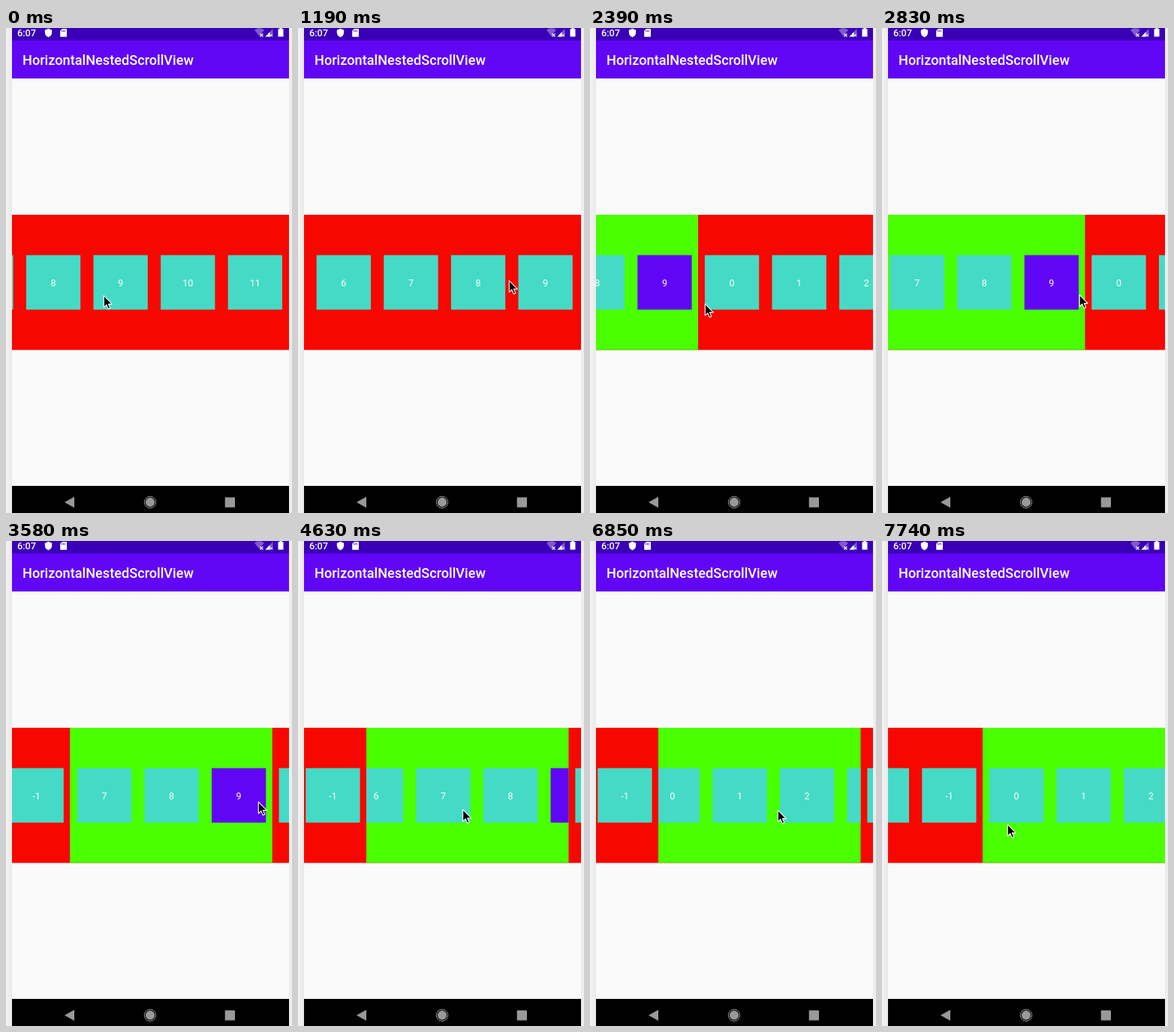
An HTML page for the animation above (8 s loop, 381x644 px).

```html
<!DOCTYPE html>
<html lang="en">
<head>
<meta charset="utf-8">
<title>Nested horizontal scrolling</title>
<style>
  html, body { margin: 0; width: 100%; height: 100%; overflow: hidden; background: #ededed; }
  svg { display: block; width: 381px; height: 644px; font-family: Roboto, "Noto Sans", sans-serif; }
</style>
</head>
<body>
<svg viewBox="0 0 381 644" xmlns="http://www.w3.org/2000/svg">
  <defs>
    <linearGradient id="edge">
      <stop offset="0" stop-color="#f3f3f3"/>
      <stop offset="1" stop-color="#e9e9e9"/>
    </linearGradient>
    <clipPath id="screen"><rect x="8" y="248" width="369" height="179.5"/></clipPath>
    <clipPath id="nest"><rect y="240" width="269.5" height="200"/></clipPath>
  </defs>

  <rect width="381" height="644" fill="#ededed"/>
  <rect width="8" height="644" fill="url(#edge)"/>
  <rect x="8" width="369" height="644" fill="#fafafa"/>
  <rect x="8" width="369" height="17" fill="#3a00b6"/>
  <rect x="8" y="16.500" width="369" height="50.500" fill="#6106f5"/>

  <g fill="#fff">
    <text x="15" y="11" font-size="12.700" font-weight="500">6:07</text>
    <path d="M56.500 .8l4.700 2v3.200c0 3-2 5.300-4.700 6.200c-2.700-.9-4.700-3.200-4.700-6.200v-3.200z"/>
    <path d="M75 1h5.200q.8 0 .8.800v9.200q0 .8-.8.800h-7.200q-.8 0-.8-.8v-7.200z"/>
    <path d="M74.600 3v2M76.500 3v2M78.400 3v2" stroke="#3a00b6" stroke-width=".9"/>
    <path d="M331 2.500q6.500-4.500 13 0l-6.500 8.500z" opacity=".35"/>
    <path d="M338.500 7.500l4 4m0-4l-4 4" stroke="#fff" stroke-width="1.100"/>
    <path d="M345.500 11.500l10-10.500v10.500z" opacity=".35"/>
    <path d="M345.500 11.500l6-6.300v6.300z"/>
    <path d="M351.500 8l3.500 3.500m0-3.500l-3.500 3.500" stroke="#fff"/>
    <path d="M364.500 0h3v1.200h2v10.300h-7v-10.300h2z"/>
    <text x="22" y="49" font-size="18.150" font-weight="500">HorizontalNestedScrollView</text>
  </g>

  <g clip-path="url(#screen)">
    <rect y="240" width="381" height="200" fill="#f60700"/>
    <g id="outer">
      <rect y="240" width="269.500" height="200" fill="#49ff00"/>
      <g clip-path="url(#nest)"><g id="inner"></g></g>
    </g>
  </g>

  <rect x="8" y="608" width="369" height="36" fill="#000"/>
  <g fill="#999">
    <path d="M78 629.700l13-7.200v14.400z"/>
    <circle cx="192" cy="629.700" r="6.100"/>
    <circle cx="192" cy="629.700" r="7.700" fill="none" stroke="#999"/>
    <rect x="291.700" y="623.200" width="13.300" height="13.300" rx=".6"/>
  </g>

  <path id="cursor" d="M0 0v15.500l3.500-3.300 2.500 5.600 2.500-1.100-2.400-5.400h4.900z"
        fill="#000" stroke="#fff" stroke-width="1.100" stroke-linejoin="round"/>
</svg>
<script>
const LOOP = 8000, STEP = 149, LAST_STEP = 52;
const PITCH = 89.6, SIZE = 72.3, MARGIN = 8.9, NEST = 269.5;
const [outer, inner, cursor] = ['outer', 'inner', 'cursor'].map(id => document.getElementById(id));

function add(parent, tag, attrs) {
  const node = document.createElementNS('http://www.w3.org/2000/svg', tag);
  for (const key in attrs) node.setAttribute(key, attrs[key]);
  return parent.appendChild(node);
}

function addTiles(parent, first, last, start, accent) {
  for (let i = first; i <= last; i++) {
    const x = start + MARGIN + i * PITCH;
    add(parent, 'rect', { x, y: 301.6, width: SIZE, height: SIZE, fill: i === accent ? '#6106f5' : '#45dac6' });
    add(parent, 'text', {
      x: x + SIZE / 2, y: 342.5, 'font-size': 12.55, 'text-anchor': 'middle', fill: '#fff'
    }).textContent = i;
  }
}

addTiles(outer, -3, -1, 0);
addTiles(outer, 0, 11, NEST);
addTiles(inner, 0, 9, 0, 9);

const drag = k => k;
const fling = k => 1 - (1 - k) ** 2;
const move = (node, x, y = 0) => node.setAttribute('transform', `translate(${x} ${y})`);

function render(time) {
  const step = Math.min(LAST_STEP, Math.floor((time % LOOP + 10) / STEP));
  const during = (from, to, ease = drag) =>
    ease(Math.min(1, Math.max(0, (step - from) / (to - from))));

  // The outer list moves until the nested one takes over, then again once that reaches its start.
  move(outer, -968.3
    + 177 * during(0, 8) + 665.8 * during(8, 16, fling)
    + 210.7 * during(16, 21) + 5.8 * during(29, 30)
    + 43 * during(48, LAST_STEP));
  move(inner, -626.5
    + 56.8 * during(30, 31) + 249.3 * during(31, 38, fling)
    + 320.4 * during(41, 48, fling));

  // The pointer alternates between dragging right and returning left.
  let x = 130.3, y = 355.3;
  const swing = (from, to, dx, dy) => {
    x += dx * during(from, to);
    y += dy * during(from, to);
  };
  swing(0, 8, 151, -20);
  swing(11, 16, -128, 31);
  swing(16, 21, 183, -20);
  swing(24, 29, -176, 17);
  swing(29, 32, 89, -10);
  swing(38, 39, -137, 13);
  swing(41, 44, 138, -9);
  swing(46, 48, -143, 12);
  swing(48, LAST_STEP, 60, 7);
  move(cursor, x, y);
}

const start = performance.now();
function tick() {
  render(performance.now() - start);
  requestAnimationFrame(tick);
}
tick();
</script>
</body>
</html>
```
